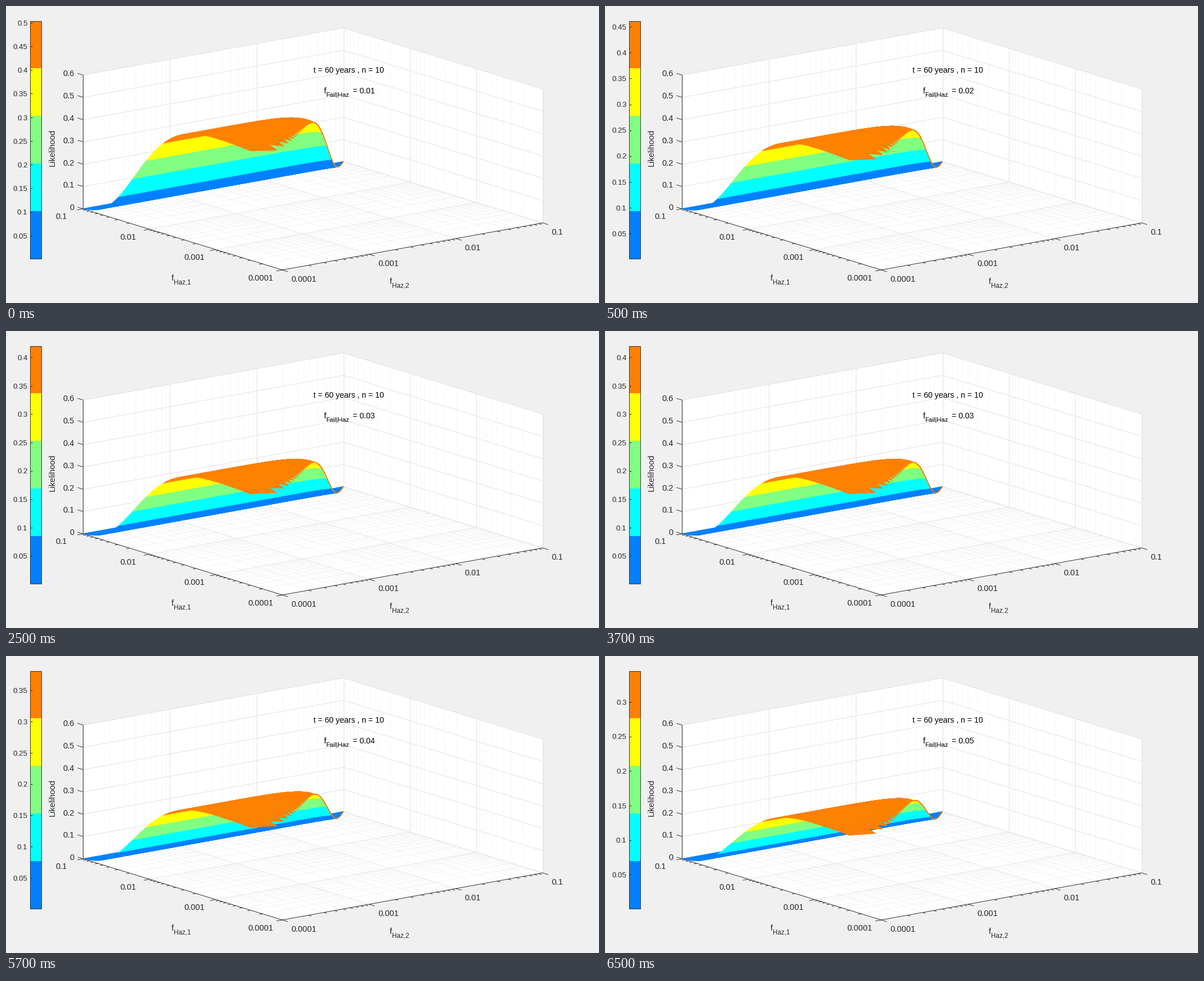
Animation of 1057x530 px, one loop 8000 ms. Source, as a matplotlib script:

```python
import numpy as np
import matplotlib.pyplot as plt
from matplotlib.animation import FuncAnimation
from matplotlib.collections import LineCollection, PolyCollection
from matplotlib.patches import Polygon, Rectangle

W, H, DPI = 1057, 530, 100
PX = 72 / DPI
INK = "#262626"
BANDS = ["#0080ff", "#00ffff", "#80ff80", "#ffff00", "#ff8000"]
PEAKS = [0.504, 0.4617, 0.4205, 0.381, 0.345]
FLOOR = 0.0034                      # smallest value relative to the peak
ORIGIN = np.array([137.5, 362.0])   # corner f1 = 0.1, f2 = 0.0001
U = np.array([355.0, 109.0])        # f1 axis, 0.1 down to 0.0001
V = np.array([464.0, -84.0])        # f2 axis, 0.0001 up to 0.1
ZPX = 398.0
BAR_X, BAR_W, BAR_TOP, BAR_BOT = 43, 20, 26.5, 450.5

plt.rcParams["font.family"] = "Liberation Sans"
fig = plt.figure(figsize=(W / DPI, H / DPI), dpi=DPI, facecolor="#f0f0f0")
ax = fig.add_axes([0, 0, 1, 1])
ax.set_xlim(0, W)
ax.set_ylim(H, 0)
ax.axis("off")


def project(a, b, z=0.0):
    x = ORIGIN[0] + U[0] * a + V[0] * b
    y = ORIGIN[1] + U[1] * a + V[1] * b - ZPX * z
    return np.stack(np.broadcast_arrays(x, y), axis=-1)


def along_f1(f):
    return (-1 - np.log10(f)) / 3


def along_f2(f):
    return (np.log10(f) + 4) / 3


def lines(segs, color, width=1.0, style="solid", z=1):
    lc = LineCollection(segs, colors=color, linewidths=width * PX,
                        linestyles=style, zorder=z)
    return ax.add_collection(lc)


def label(x, y, s, size=14.67, ha="left", color=INK, **kw):
    return ax.text(x, y, s, fontsize=size * PX, ha=ha, va="baseline",
                   color=color, zorder=6, **kw)


# ---- box, grid and axes ----
def draw_box():
    hull = [project(a, b, z) for a, b, z in
            [(0, 0, 0), (1, 0, 0), (1, 1, 0), (1, 1, .6), (0, 1, .6), (0, 0, .6)]]
    ax.add_patch(Polygon(hull, fc="white", ec="none", zorder=0))

    decades = 10.0 ** np.arange(-4, 0)
    minors = [m * d for d in decades[:3] for m in range(2, 10)]
    heights = np.arange(7) / 10

    floor, wall, major = [], [], []
    for f in minors:
        a, b = along_f1(f), along_f2(f)
        floor += [[project(a, 0), project(a, 1)], [project(0, b), project(1, b)]]
        wall += [[project(a, 1), project(a, 1, .6)], [project(0, b), project(0, b, .6)]]
    for f in decades:
        a, b = along_f1(f), along_f2(f)
        major += [[project(a, 0), project(a, 1)], [project(a, 1), project(a, 1, .6)],
                  [project(0, b), project(1, b)], [project(0, b), project(0, b, .6)]]
    for z in heights:
        major.append([project(0, 0, z), project(0, 1, z), project(1, 1, z)])
    lines(floor, "#d6d6d6", 0.8, (0, (1, 2)))
    lines(wall, "#e4e4e4", 0.8, (0, (1, 1.5)))
    lines(major, "#dfdfdf", 0.9)

    du, dv = U / np.hypot(*U), V / np.hypot(*V)
    axes = [[project(0, 0, .6), project(0, 0), project(1, 0), project(1, 1)]]
    for group, size in ((decades, 10.5), (minors, 5.5)):
        for f in group:
            p, q = project(along_f1(f), 0), project(1, along_f2(f))
            axes += [[p, p - size * dv], [q, q + size * du]]
    for z in heights:
        p = project(0, 0, z)
        axes.append([p, p - 10.5 * du])
        label(122, p[1] + 2.2, f"{z:g}", ha="right")
    lines(axes, INK, 0.9, z=2)

    for f in decades:
        p, q = project(along_f1(f), 0), project(1, along_f2(f))
        label(p[0] - 38.5, p[1] + 18.5, f"{f:g}", ha="center")
        label(q[0] + 16, q[1] + 20.5, f"{f:g}")


def draw_titles():
    for x, y, n in ((295, 490, 1), (684, 496, 2)):
        label(x, y, "f")
        label(x + 4, y + 6, f"Haz,{n}", 11.6)
    ax.text(83, 252.5, "Likelihood", fontsize=14.67 * PX, rotation=90,
            ha="center", va="center", color=INK)
    label(547.5, 119, "t = 60 years , n = 10", 14.1, color="black")
    label(566.5, 155.5, "f", 14.1, color="black")
    label(570.5, 162, "Fail|Haz", 11.4, color="black")


# ---- surface ----
def likelihood(f1, f2):
    rise = 0.595 - 0.11 * np.exp(-(f1 / 0.0021) ** 0.9)
    return rise * (1 - 0.12 * (f2 / f1) ** 2.5) * np.exp(-60 * f1)


def build_surface():
    """Nodes of the sheet f1 > f2, with rows following the colour bands."""
    step = 1e-4
    j = np.arange(1, 100)
    f2 = np.ravel(np.column_stack([j, j + 1])) * step
    limit = np.repeat(j + 2, 2) * step
    tail = np.geomspace(0.0101, 0.0998, 90)
    f2 = np.concatenate([f2, tail])
    limit = np.concatenate([limit, tail + step])

    top = PEAKS[0]
    levels = top * (FLOOR + (1 - FLOOR) * np.arange(1, 5) / 5)
    edges = np.empty((6, f2.size))
    for c, (g, low) in enumerate(zip(f2, limit)):
        f1 = np.geomspace(0.1, low, 400)
        z = np.maximum.accumulate(likelihood(f1, g))
        edges[0, c], edges[5, c] = 0, along_f1(low)
        edges[1:5, c] = np.interp(levels, z, along_f1(f1))

    quads_a, quads_b, colors = [], [], []
    b = along_f2(f2)
    for k, n in enumerate((14, 8, 8, 10, 46)):
        t = np.linspace(0, 1, n + 1)[:, None]
        a = edges[k] + t * (edges[k + 1] - edges[k])
        bb = np.broadcast_to(b, a.shape)
        for src, out in ((a, quads_a), (bb, quads_b)):
            cell = np.stack([src[:-1, :-1], src[:-1, 1:], src[1:, 1:], src[1:, :-1]], -1)
            out.append(cell.reshape(-1, 4))
        colors += [BANDS[k]] * (n * (b.size - 1))
    a, b = np.concatenate(quads_a), np.concatenate(quads_b)
    z = likelihood(10 ** (-1 - 3 * a), 10 ** (3 * b - 4))
    return a, b, z, colors


draw_box()
draw_titles()
qa, qb, qz, qcolors = build_surface()
sheet = PolyCollection(project(qa, qb, qz), facecolors=qcolors, edgecolors=qcolors,
                       linewidths=0.6 * PX, zorder=3)
ax.add_collection(sheet)

# ---- colour bar ----
band_h = (BAR_BOT - BAR_TOP) / 5
for i, c in enumerate(BANDS):
    ax.add_patch(Rectangle((BAR_X, BAR_BOT - (i + 1) * band_h), BAR_W, band_h,
                           fc=c, ec="none", zorder=3))
ax.add_patch(Rectangle((BAR_X, BAR_TOP), BAR_W, BAR_BOT - BAR_TOP,
                       fc="none", ec=INK, lw=0.9 * PX, zorder=4))
bar_ticks = lines([], INK, 0.9, z=5)
bar_labels = [label(38.5, 0, "", 13.3, ha="right") for _ in range(10)]
fail_text = label(617.5, 155.5, "", 14.1, color="black")


def update(i):
    k = (i + 3) // 4
    top = PEAKS[k]
    low = FLOOR * top
    sheet.set_verts(project(qa, qb, qz * top / PEAKS[0]))

    ticks = []
    for n, text in enumerate(bar_labels, 1):
        v = n * 0.05
        y = BAR_BOT - (v - low) / (top - low) * (BAR_BOT - BAR_TOP)
        text.set_visible(v < top)
        if v < top:
            text.set_text(f"{v:.2g}")
            text.set_y(y + 4.8)
            ticks.append([(BAR_X, y), (BAR_X + 4, y)])
    bar_ticks.set_segments(ticks)
    fail_text.set_text(f"= 0.0{k + 1}")
    return [sheet, bar_ticks, fail_text, *bar_labels]


anim = FuncAnimation(fig, update, frames=16, interval=500, repeat=True,
                     repeat_delay=0, blit=False)
plt.show()
```
